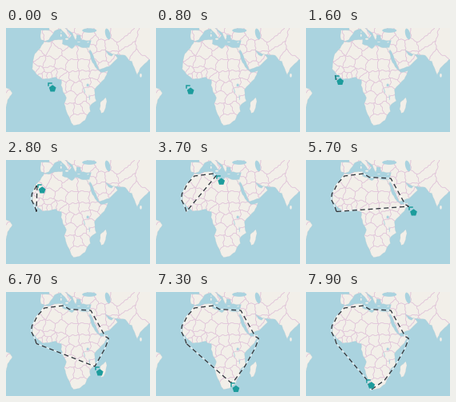
Recreate the animation shown at these times as a matplotlib script. Size 180 by 130 pixels, loop 8000 ms.

```python
import numpy as np
import matplotlib.pyplot as plt
from matplotlib.animation import FuncAnimation
from matplotlib.patches import Ellipse, PathPatch, Polygon
from matplotlib.path import Path

W, H, DPI = 180, 130, 100
PX = 72 / DPI
STEP, FRAMES = 100, 80
SCALE, X0, Y0 = 1.39, 56.3, 70

SEA, LAND, BORDER = "#aad3df", "#f2efe9", "#dfbfd8"
SHORE, TEAL, INK = "#b9cfd4", "#1c9c9c", "#2b3238"

# Coastlines as (lon, lat)
AFRICA = [
    (-5.9, 35.8), (-2, 35.1), (3, 36.8), (10.5, 37.2), (10, 34), (15.2, 32.4),
    (19, 30.3), (21.7, 32.9), (29, 30.9), (32.5, 31.1), (32.6, 29.9),
    (35.5, 24), (37.4, 18.8), (39.7, 15.2), (43.2, 12), (44.5, 10.4),
    (51.2, 11.9), (48, 4.5), (39, -5), (40.7, -15), (34.8, -19.8),
    (35.4, -24), (32.7, -26.5), (30.5, -31), (25.6, -34), (20, -34.8),
    (18.3, -33), (15, -26.5), (11.8, -17.5), (13.7, -12), (9, -1), (9.5, 3.8),
    (6, 4.3), (4.5, 6.3), (-2, 4.8), (-7.6, 4.4), (-13.3, 9), (-17, 13.5),
    (-16.2, 19), (-14.5, 26.3), (-9.8, 30.5),
]
EUROPE = [
    (-1.5, 55), (-1.5, 43.4), (-9, 43.5), (-9, 37), (-5.5, 36), (-2.2, 36.8),
    (0, 39.5), (3.2, 43), (8.8, 44.4), (12.3, 41.7), (16, 38), (18.4, 40),
    (12.4, 45), (19.4, 41.5), (22.3, 36.6), (23, 40.4), (26.3, 40),
    (27.5, 36.9), (36, 36.5), (34.3, 31.2), (32.4, 31.1),
]
ASIA = [
    (32.6, 30), (34.2, 27.8), (34.9, 29.5), (39, 21.8), (43.3, 12.8),
    (52.2, 15.7), (59.8, 22.5), (56.3, 26.2), (54.5, 24.3), (51.5, 25.5),
    (48.3, 29.7), (52, 27.5), (57.3, 25.7), (66.5, 25), (70, 21), (72.7, 20),
    (77.5, 8.1), (80.2, 14), (88, 21.5), (95, 21), (95, 55),
]
BRAZIL = [(-50, 0), (-37, -4.8), (-34.8, -8), (-39, -14), (-41, -22), (-50, -26)]
MADAGASCAR = [(49.3, -12), (50.2, -15.6), (47.2, -24.8), (45.2, -25.5),
              (43.6, -22), (44.4, -16.2)]

# Small islands and inland waters: lon, lat, width and height in pixels, tilt
ISLANDS = [(14.2, 37.5, 4, 2, 0), (9, 40, 1.7, 3.4, 0), (9.1, 42.2, 1, 2, 0),
           (24.9, 35.2, 3.8, 0.8, 0), (33.3, 35.1, 2.6, 1, -20),
           (80.7, 7.7, 2.6, 4.8, 0)]
LAKES = [(34.5, 43.3, 18, 5.5, 0), (51, 41, 6, 14, -15), (33, -1, 3.2, 3.6, 0),
         (30, -6, 0.9, 7, -15), (34.5, -12, 0.9, 7, -5)]

# Countries by their centres; borders run midway between neighbours
AFRICAN = [
    (-6, 32), (-13, 24.5), (-10.5, 20), (3, 28), (-2, 18), (9, 17.5),
    (17.5, 27), (18.5, 15.5), (30, 27), (30, 16), (9.5, 34), (-14.5, 14.3),
    (-11, 10.7), (-9.5, 6.5), (-5.5, 7.5), (-1.2, 7.8), (-1.7, 12.4),
    (2.2, 9), (8, 9.5), (12.5, 5.5), (20.5, 6.7), (30, 7.5), (39.5, 8.5),
    (38.5, 15.8), (47, 5), (38, 0.5), (32.3, 1.5), (35, -6.3), (23.5, -3),
    (15, -0.5), (11.5, -0.8), (17.5, -12.3), (27, -14), (37, -15), (30, -19),
    (24, -22), (17, -22), (24.5, -30), (47, -19),
]
EURASIAN = [
    (-10, 39.6), (-4, 40), (2.5, 46), (12, 43), (18, 44), (22, 39.3),
    (25, 43), (33, 39), (38.5, 35), (43.5, 33), (36.5, 31), (45, 24),
    (47, 15.5), (57, 20.5), (54, 23.7), (54, 32.5), (60, 40), (66, 34),
    (69, 29.5), (78, 23), (47, 41), (84, 30),
]

# Pointer path: time in ms, x, y
PATH = np.array([
    (0, 52, 68), (600, 33, 75.5), (900, 39, 69), (1300, 38, 64.5),
    (1600, 36.5, 59.5), (1950, 31.5, 49), (2300, 32.5, 42), (2600, 36, 36.5),
    (2700, 36, 36.5), (2800, 39, 30), (3100, 48, 20), (3600, 72, 17),
    (3800, 79, 21.5), (4500, 106, 23), (4600, 106, 23), (5400, 124, 55.5),
    (5700, 128.3, 58), (6000, 124, 70), (6700, 111, 93), (7200, 98, 110.5),
    (7600, 81, 122.5), (7900, 75.5, 109),
])
DRAW_FROM = 1300


def project(points):
    lon, lat = np.array(points, float).T
    merc = np.degrees(np.log(np.tan(np.radians(45 + lat / 2))))
    return np.column_stack([X0 + SCALE * lon, Y0 - SCALE * merc])


def roughen(points, rng, rounds=2, amount=0.07):
    """Split every edge and push its middle sideways."""
    for _ in range(rounds):
        edge = np.roll(points, -1, axis=0) - points
        push = rng.uniform(-amount, amount, (len(points), 1))
        mid = points + edge / 2 + push * edge[:, ::-1] * (-1, 1)
        points = np.stack([points, mid], axis=1).reshape(-1, 2)
    return points


def draw_borders(clip):
    x, y = np.meshgrid(np.linspace(0, W, 361), np.linspace(0, H, 261))
    wx = x + 0.7 * np.sin(y / 2.3) + 0.4 * np.sin(x / 1.7 + y)
    wy = y + 0.7 * np.sin(x / 2.1) + 0.4 * np.sin(y / 1.9 - x)
    centres = project(AFRICAN + EURASIAN)
    dist = np.array([np.hypot(wx - cx, wy - cy) for cx, cy in centres])
    first, second = np.partition(dist, 1, axis=0)[:2]
    for d in dist:
        rival = np.where(d == first, second, first)
        lines = ax.contour(x, y, d - rival, levels=[0], colors=BORDER,
                           linewidths=0.5 * PX)
        lines.set_clip_path(clip)


def add_ellipses(items, color):
    for lon, lat, w, h, tilt in items:
        ax.add_patch(Ellipse(project([(lon, lat)])[0], w, h, angle=tilt,
                             fc=color, ec="none", zorder=3))


def pointer(t):
    return np.array([np.interp(t, PATH[:, 0], PATH[:, k]) for k in (1, 2)])


fig = plt.figure(figsize=(W / DPI, H / DPI), dpi=DPI, facecolor=SEA)
ax = fig.add_axes([0, 0, 1, 1])
ax.axis("off")

rng = np.random.default_rng(4)
coasts = [Path(roughen(project(c), rng)) for c in
          (EUROPE + ASIA, AFRICA, BRAZIL, MADAGASCAR)]
for coast in coasts:
    ax.add_patch(PathPatch(coast, fc=LAND, ec=SHORE, lw=0.25 * PX))
land = PathPatch(Path.make_compound_path(*coasts), transform=ax.transData)
draw_borders(land)
add_ellipses(ISLANDS, LAND)
add_ellipses(LAKES, SEA)
ax.set(xlim=(0, W), ylim=(H, 0))

halo, = ax.plot([], [], color="white", alpha=0.75, lw=1.3 * PX, zorder=4)
lasso, = ax.plot([], [], color=INK, lw=1.3 * PX, zorder=5,
                 ls=(0, (4.6, 3)), dash_capstyle="butt")
corner, = ax.plot([], [], color=TEAL, lw=1.5 * PX, zorder=6,
                  solid_joinstyle="miter")
angles = np.radians(-90 + 72 * np.arange(5))
PENTAGON = 4.6 * np.column_stack([np.cos(angles), np.sin(angles)]) + (6.2, 7.8)
CORNER = np.array([(0.6, 4.2), (0.6, 0.8), (4.6, 0.8)])
badge = ax.add_patch(Polygon(PENTAGON, fc=TEAL, ec="none", zorder=7))


def draw(i):
    t = i * STEP
    tip = pointer(t)
    trail = np.empty((0, 2))
    if t > DRAW_FROM:
        passed = (PATH[:, 0] >= DRAW_FROM) & (PATH[:, 0] < t)
        trail = np.vstack([PATH[passed, 1:], tip, pointer(DRAW_FROM)])
    for line in (halo, lasso):
        line.set_data(trail[:, 0], trail[:, 1])
    corner.set_data(*(CORNER + tip).T)
    badge.set_xy(PENTAGON + tip)
    return halo, lasso, corner, badge


anim = FuncAnimation(fig, draw, frames=FRAMES, interval=STEP,
                     repeat=True, repeat_delay=0)
plt.show()
```
